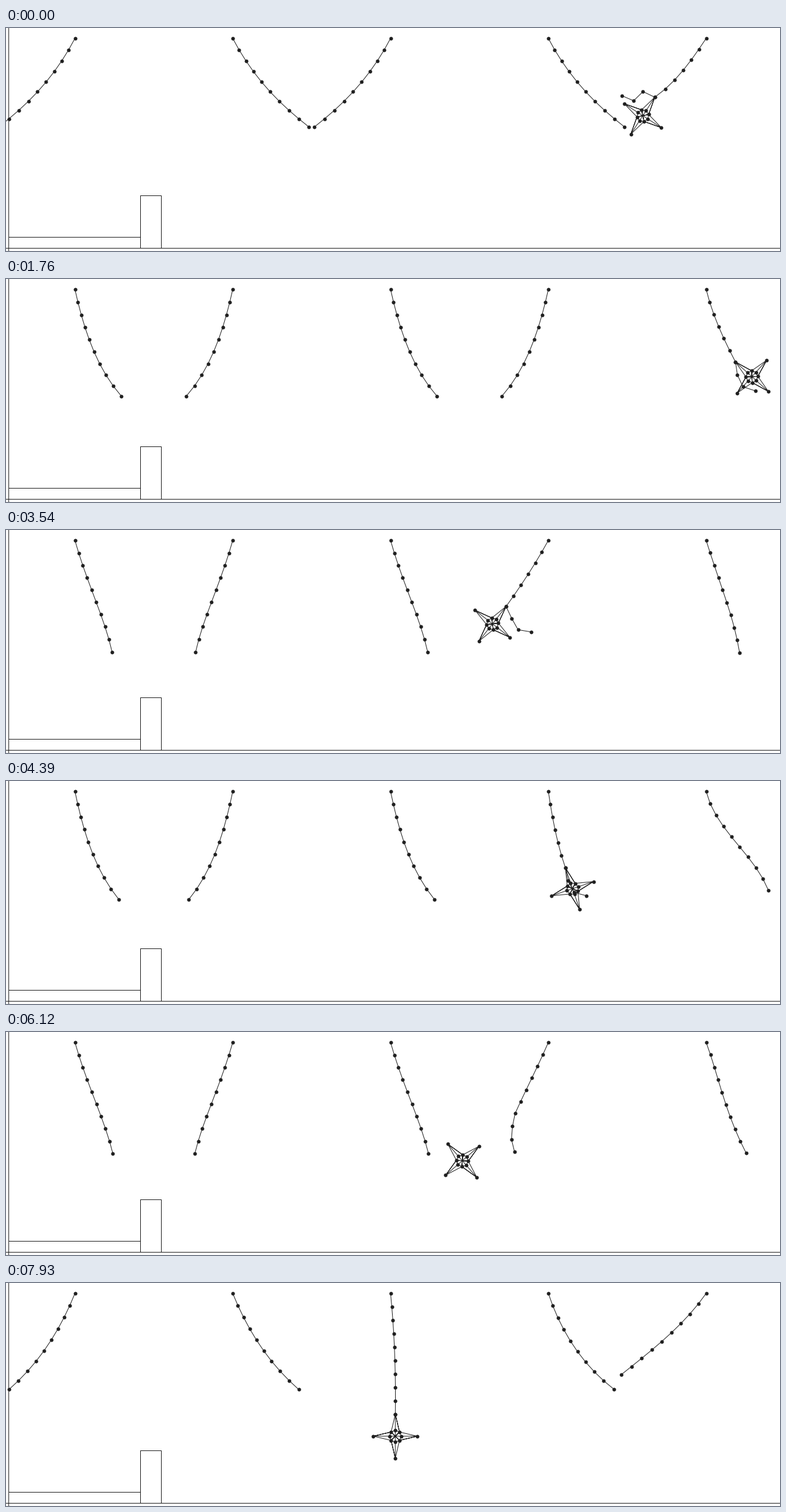
A matplotlib script for the animation above (7990 ms loop, 1263 by 365 pixels).

```python
import numpy as np
import matplotlib.pyplot as plt
from matplotlib.animation import FuncAnimation
from matplotlib.patches import Rectangle

W, H, DPI = 1263, 365, 100
LOOP, STEP = 7990, 47
INK = "#202020"
PX = 72 / DPI

PIVOTS = [(112 + 257.5 * i, 16.5) for i in range(5)]
SIDES = [-1, 1, -1, 1, -1]
LINKS, LINK = 9, 21.4
ARM, HUB = 36, 9.7
GRAVITY = 7.7e-4

u = np.linspace(0, 1, LINKS)

# Spans in which the star hangs: from, to, rope, held node, arm in degrees
HOLDS = [
    (-200, 2320, 4, 6, 0),
    (2550, 5800, 3, 6, 0),
    (6180, LOOP, 2, 9, -90),
]

# Key moments of the disturbed ropes: time, then the lean in degrees at the
# top, middle and end. A bare time means the rope still swings freely.
KEYS = {
    2: [(6180,), (6500, 3, -2, -6), (6870, -24, -36, -29), (7930, 6, 3, 0)],
    3: [(2550,), (2740, 21, 16, 0), (3550, -30, -35, -38), (4390, 9, 15.5, 28),
        (4930, 27, 37, 40), (5370, 18, 27, 32), (5800, -8, -2, 6),
        (6870, -6, -6, 7), (7930, 19, 33, 50)],
    4: [(0, -34, -46, -75), (1760, 15, 25, 28), (2740, -30, -60, -50),
        (4390, 18, 39, 25), (5370, -26, -56, -68), (6870, 20, 36, 79),
        (7930, -36, -47, -51)],
}

TURN = [(0, 33), (1300, -50), (1760, -48), (2320, 22), (2740, 8), (3550, 38),
        (4390, -19), (5370, -38), (5800, 8), (6500, 100), (6870, 151),
        (7930, 90)]


def spline(t, ts, vs):
    """Monotone cubic through the knots (ts, vs), held constant outside."""
    ts, vs = np.asarray(ts, float), np.asarray(vs, float)
    t = np.clip(t, ts[0], ts[-1])
    h = np.diff(ts)
    slope = (np.diff(vs, axis=0).T / h).T
    a, b = slope[:-1], slope[1:]
    same = a * b > 0
    tangent = np.zeros_like(vs)
    tangent[1:-1] = np.where(same, 2 * a * b / np.where(same, a + b, 1), 0)
    i = min(np.searchsorted(ts, t, side="right") - 1, len(h) - 1)
    s = (t - ts[i]) / h[i]
    return (vs[i] * (1 + 2 * s) * (1 - s) ** 2 + vs[i + 1] * s * s * (3 - 2 * s)
            + h[i] * (tangent[i] * s * (1 - s) ** 2
                      + tangent[i + 1] * s * s * (s - 1)))


def swing(t):
    """Link angles of a free rope: damped, with the lower links trailing."""
    phase = 2 * np.pi * np.interp(t, [0, 2642, 5258, 7745, 8242],
                                  [0, 1, 2, 3, 3.2])
    lag = 0.36 * u ** 2 - 0.06
    return (29 + 24 * u) * np.exp(-t / 70000) * np.cos(phase - lag)


def bend(top, mid, low):
    return (2 * top * (u - 0.5) * (u - 1) + 4 * mid * u * (1 - u)
            + 2 * low * u * (u - 0.5))


def pull_knots(rope):
    """Knots of the difference between the bent rope and its free swing."""
    pulls = [bend(*lean) - SIDES[rope] * swing(t) if lean else 0 * u
             for t, *lean in KEYS[rope]]
    return [key[0] for key in KEYS[rope]], pulls


PULLS = {rope: pull_knots(rope) for rope in KEYS}


def add_slack(angle, t, hold):
    """Links below the held node: folded up by the catch, then curling down."""
    start, end, rope, node, _ = hold
    k = np.arange(LINKS - node)
    grip = np.interp(t, [start, start + 180, end, end + 500], [0, 1, 1, 0])
    kick = np.exp(-max(t - start - 200, 0) / 400)
    fold = SIDES[rope] * 120 * np.where(k % 2, 0.4, 1)
    curl = 10 + 16 * k ** 2
    slack = kick * fold + (1 - kick) * curl
    angle[node:] += grip * (slack - angle[node:])


def rope_nodes(rope, t):
    angle = SIDES[rope] * swing(t)
    if rope in PULLS:
        angle = angle + spline(t, *PULLS[rope])
    length = LINK
    for hold in HOLDS:
        if hold[2] != rope:
            continue
        if hold[3] < LINKS:
            add_slack(angle, t, hold)
        else:
            length += 0.6 * np.clip((t - hold[0]) / 300, 0, 1)
    a = np.radians(angle)
    steps = length * np.column_stack([np.sin(a), np.cos(a)])
    return np.vstack([[0, 0], np.cumsum(steps, axis=0)]) + PIVOTS[rope]


def heading(deg):
    a = np.radians(deg)
    return np.stack([np.sin(a), -np.cos(a)], axis=-1)


def star_turn(t):
    return spline(t, *zip(*TURN))


def held_center(hold, t):
    _, _, rope, node, arm = hold
    return rope_nodes(rope, t)[node] - ARM * heading(star_turn(t) + arm)


def star_center(t):
    i = next(i for i, hold in enumerate(HOLDS) if t <= hold[1])
    t1 = HOLDS[i][0]
    if t >= t1:
        return held_center(HOLDS[i], t)
    # Ballistic flight from one rope to the next
    t0 = HOLDS[i - 1][1]
    s = (t - t0) / (t1 - t0)
    p = (1 - s) * held_center(HOLDS[i - 1], t0) + s * held_center(HOLDS[i], t1)
    return p - [0, GRAVITY / 2 * (t - t0) * (t1 - t)]


def star_shape(t):
    """Dots of the star and one stroke that runs along all its struts."""
    c, turn = star_center(t), star_turn(t)
    ring = c + HUB * heading(turn + 45 * np.arange(8))
    tips = c + ARM * heading(turn + 90 * np.arange(4))
    stroke = []
    for k, tip in enumerate(tips):
        left, mid, right = ring[2 * k - 1], ring[2 * k], ring[2 * k + 1]
        stroke += [left, tip, mid, c, right, tip, right, mid, left, c, right]
    return np.vstack([tips, ring]), np.array(stroke)


plt.rcParams["path.snap"] = False
fig = plt.figure(figsize=(W / DPI, H / DPI), dpi=DPI, facecolor="white")
ax = fig.add_axes([0, 0, 1, 1])
# Whole numbers fall on pixel centres
ax.set_xlim(-0.5, W - 0.5)
ax.set_ylim(H - 0.5, -0.5)
ax.axis("off")

thin = dict(color=INK, lw=PX)
disc = dict(marker="o", ms=6 * PX, mew=0)
ax.plot([4, 4], [-1, H], **thin)
ax.plot([-1, W], [360, 360], **thin)
ax.plot([4, 219], [342, 342], **thin)
ax.add_patch(Rectangle((219, 274), 34, 86, fill=False, ec=INK, lw=PX))

ropes = [ax.plot([], [], **thin, **disc)[0] for _ in PIVOTS]
struts, = ax.plot([], [], **thin)
dots, = ax.plot([], [], ls="", color=INK, **disc)


def draw(i):
    t = i * STEP + 14
    for rope, line in enumerate(ropes):
        line.set_data(*rope_nodes(rope, t).T)
    points, stroke = star_shape(t)
    struts.set_data(*stroke.T)
    dots.set_data(*points.T)
    return [*ropes, struts, dots]


anim = FuncAnimation(fig, draw, frames=LOOP // STEP, interval=STEP,
                     repeat=True, repeat_delay=0, blit=False)
plt.show()
```
